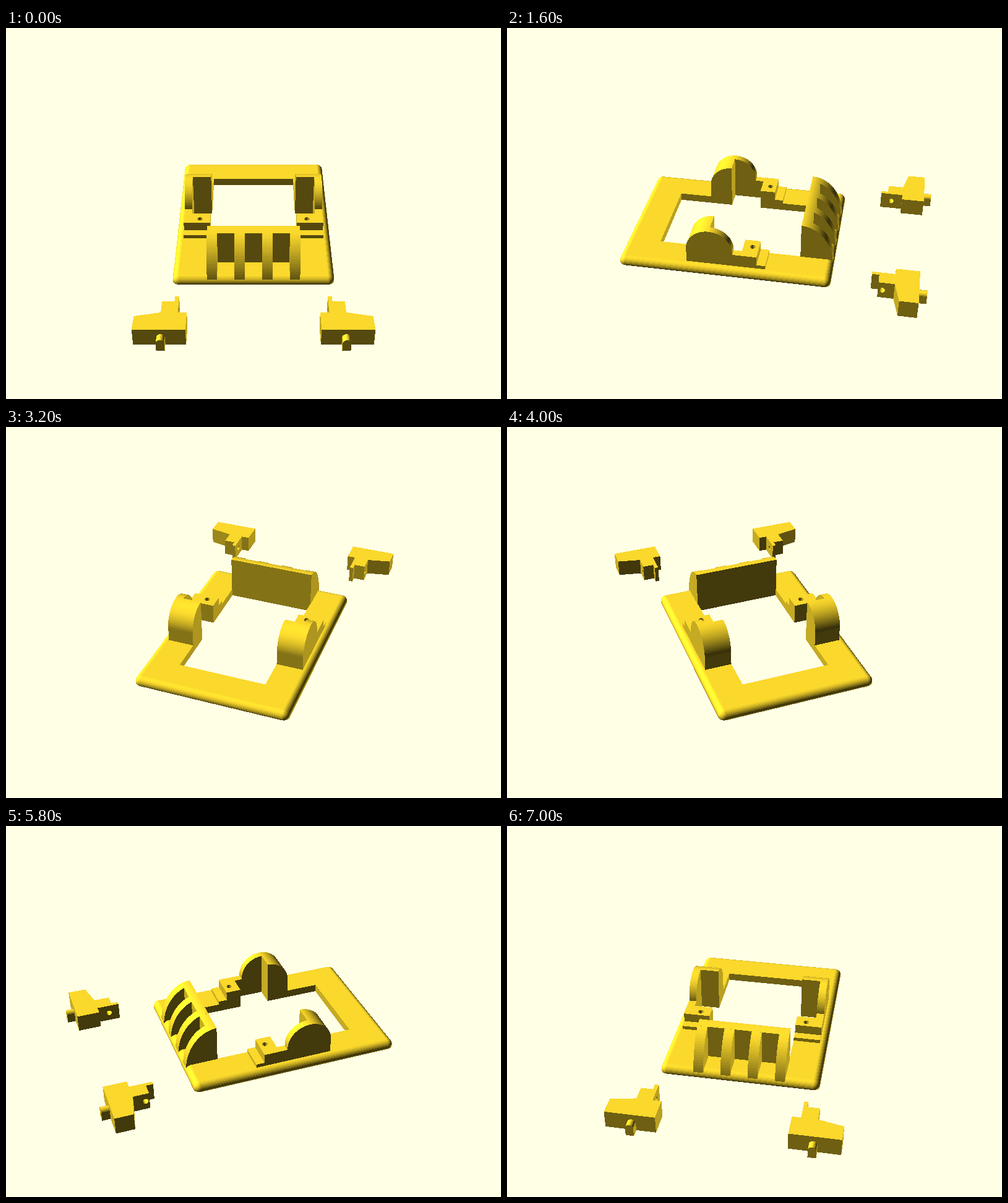
An HTML page with a canvas that plays this animation: 800x600 px, repeating every 7.2 s.

```html
<!DOCTYPE html>
<html lang="en">
<head>
<meta charset="utf-8">
<title>Rotating printed parts</title>
<style>
html, body { margin: 0; width: 100%; height: 100%; overflow: hidden; background: #ffffe5; }
canvas { display: block; }
</style>
</head>
<body>
<canvas id="stage" width="800" height="600"></canvas>
<script>
const W = 800, H = 600, STEP = 200, STEPS = 36;
const DIST = 300 / Math.tan(Math.PI / 16); // 22.5 degree field of view
const TILT = 55 * Math.PI / 180, ct = Math.cos(TILT), st = Math.sin(TILT);
const BASE = [249, 215, 44];

// ---- model: every face is a list of loops, filled even-odd ----
const faces = [];
const alongX = (u, v, t) => [t, u, v];
const alongY = (u, v, t) => [u, t, v];
const alongZ = (u, v, t) => [u, v, t];

const rect = (u0, v0, u1, v1) => [[u0, v0], [u1, v0], [u1, v1], [u0, v1]];

function arc(cu, cv, ru, rv, from, to, n) {
  return Array.from({ length: n + 1 }, (_, i) => {
    const a = (from + (to - from) * i / n) * Math.PI / 180;
    return [cu + ru * Math.cos(a), cv + rv * Math.sin(a)];
  });
}

const circle = (u, v, r) => arc(u, v, r, r, 0, 345, 23);

function join(a, b) {
  a.forEach((p, i) => {
    const j = (i + 1) % a.length;
    faces.push([[p, a[j], b[j], b[i]]]);
  });
}

function extrude(loops, from, to, axis) {
  const at = t => loops.map(loop => loop.map(([u, v]) => axis(u, v, t)));
  const a = at(from), b = at(to);
  faces.push(a, b);
  a.forEach((loop, i) => join(loop, b[i]));
}

const box = (x0, y0, z0, x1, y1, z1) => extrude([rect(x0, y0, x1, y1)], z0, z1, alongZ);

const TOP = -23, BOTTOM = -36;
const HOLE = 69.6, SLOT = 99.5, SIDE = 111.5; // distances from the middle plane
const HOOD = -85, PAD = 2;                    // front end of the hole, rear end of the pads

function buildPlate() {
  const x = 113, front = -127.5, back = 183.5, r = 10, bands = 18;
  const lowest = Math.asin((BOTTOM - TOP + r) / r) * 180 / Math.PI;
  const ring = deg => {
    const a = deg * Math.PI / 180, c = r * Math.cos(a), z = TOP - r + r * Math.sin(a);
    return [[x, back, 0], [-x, back, 90], [-x, front, 180], [x, front, 270]]
      .flatMap(([cx, cy, d]) => arc(cx, cy, c, c, d, d + 90, 8))
      .map(([u, v]) => [u, v, z]);
  };
  const opening = [
    [-HOLE, HOOD], [HOLE, HOOD], [HOLE, PAD], [SLOT, PAD], [SLOT, 51], [HOLE, 51],
    [HOLE, 139.5], [-HOLE, 139.5], [-HOLE, 51], [-SLOT, 51], [-SLOT, PAD], [-HOLE, PAD]
  ];
  const level = z => opening.map(([u, v]) => [u, v, z]);
  const rings = Array.from({ length: bands + 1 }, (_, i) => ring(90 + (lowest - 90) * i / bands));
  for (let i = 0; i < bands; i++) join(rings[i], rings[i + 1]);
  faces.push([rings[0], level(TOP)], [rings[bands], level(BOTTOM)]);
  join(level(TOP), level(BOTTOM));
}

function buildHood() {
  const depth = 51, half = 70.5, ribWidth = 15.3, ribStep = 41.9, base = -32;
  const profile = reach => {
    const end = 180 - Math.acos(reach / depth) * 180 / Math.PI;
    return [[HOOD, base], ...arc(HOOD, base, depth, 68, 90, end, reach < depth ? 6 : 24), [HOOD - reach, base]];
  };
  extrude([profile(14)], -half, half, alongX);
  for (let i = 0; i < 4; i++) {
    const x = -half + i * ribStep;
    extrude([profile(depth)], x, x + ribWidth, alongX);
  }
}

function buildSide(s) {
  // wheel arch: thin outer disc, thick rear half
  const arch = (to, n) => [[87, TOP], ...arc(51, 1, 36, 36, 0, to, n), [to > 90 ? 15 : 51, TOP]];
  extrude([arch(180, 40)], s * SLOT, s * SIDE, alongX);
  extrude([arch(90, 20)], s * HOLE, s * SIDE, alongX);
  // screw pad, its link to the disc and a low step in front
  extrude([rect(s * HOLE, -22.5, s * SIDE, PAD), circle(s * 86, -12.5, 4.5)], TOP, -2, alongZ);
  box(s * SLOT, PAD, TOP, s * SIDE, 16, -2);
  box(s * HOLE, -36, TOP, s * SIDE, -22.5, -17);
}

function buildClip(s) {
  const body = [[169, -269], [94.5, -269], [94.5, -233], [131.5, -233], [169, -241]];
  extrude([body.map(([x, y]) => [s * x, y])], BOTTOM, -8, alongZ);
  extrude([rect(-233, BOTTOM, -209, -8), circle(-215, -22, 4.5)], s * 107.5, s * 131.5, alongX);
  box(s * 107.5, -209, BOTTOM, s * 113.5, -198, -8);
  const cx = s * 129.5;
  extrude([[[cx + 6, BOTTOM], ...arc(cx, -22.5, 6, 6, 0, 180, 16), [cx - 6, BOTTOM]]], -281.5, -269, alongY);
}

buildPlate();
buildHood();
for (const s of [-1, 1]) {
  buildSide(s);
  buildClip(s);
}

// ---- depth-buffered polygon renderer ----
const ctx = document.getElementById("stage").getContext("2d");
const image = ctx.createImageData(W, H);
const pixels = new Uint32Array(image.data.buffer);
const depth = new Float32Array(W * H);
const pack = (r, g, b) => (255 << 24 | b << 16 | g << 8 | r) >>> 0;
const BACKGROUND = pack(255, 255, 229);

function planeNormal(loop) {
  const n = [0, 0, 0];
  loop.forEach((p, i) => {
    const q = loop[(i + 1) % loop.length];
    for (let k = 0; k < 3; k++) {
      const a = (k + 1) % 3, b = (k + 2) % 3;
      n[k] += (p[a] - q[a]) * (p[b] + q[b]);
    }
  });
  const len = Math.hypot(...n);
  return len > 1e-6 ? n.map(v => v / len) : null;
}

function drawFace(loops) {
  const n = planeNormal(loops[0]);
  if (!n) return;
  const p = loops[0][0], d = n[0] * p[0] + n[1] * p[1] + n[2] * p[2];
  if (Math.abs(d) < 1e-4) return;

  const light = 0.2 + Math.abs(n[1] - n[0] - n[2]) / Math.sqrt(3);
  const color = pack(...BASE.map(c => Math.min(255, Math.round(c * light))));

  const edges = [];
  let top = H, bottom = 0;
  for (const loop of loops) {
    const pts = loop.map(([x, y, w]) => [W / 2 + DIST * x / w, H / 2 - DIST * y / w]);
    pts.forEach((a, i) => {
      edges.push([a, pts[(i + 1) % pts.length]]);
      top = Math.min(top, a[1]);
      bottom = Math.max(bottom, a[1]);
    });
  }

  const lastRow = Math.min(H, Math.ceil(bottom - 0.5));
  for (let row = Math.max(0, Math.ceil(top - 0.5)); row < lastRow; row++) {
    const y = row + 0.5, cuts = [];
    for (const [a, b] of edges) {
      if ((a[1] <= y) !== (b[1] <= y)) cuts.push(a[0] + (b[0] - a[0]) * (y - a[1]) / (b[1] - a[1]));
    }
    cuts.sort((a, b) => a - b);
    const rowPart = n[1] * (H / 2 - y) + n[2] * DIST;
    for (let i = 0; i + 1 < cuts.length; i += 2) {
      const end = Math.min(W, Math.ceil(cuts[i + 1] - 0.5));
      for (let x = Math.max(0, Math.ceil(cuts[i] - 0.5)); x < end; x++) {
        const near = (n[0] * (x + 0.5 - W / 2) + rowPart) / d, at = row * W + x;
        if (near > depth[at]) {
          depth[at] = near;
          pixels[at] = color;
        }
      }
    }
  }
}

function render(step) {
  const angle = step * 2 * Math.PI / STEPS, c = Math.cos(angle), s = Math.sin(angle);
  const toEye = ([x, y, z]) => {
    const v = s * x + c * y;
    return [c * x - s * y, ct * v + st * z, DIST + st * v - ct * z];
  };
  pixels.fill(BACKGROUND);
  depth.fill(0);
  for (const face of faces) drawFace(face.map(loop => loop.map(toEye)));
  ctx.putImageData(image, 0, 0);
}

const start = performance.now();
let shown = -1;
function tick() {
  const step = Math.floor(Math.max(0, performance.now() - start) / STEP) % STEPS;
  if (step !== shown) render(shown = step);
  requestAnimationFrame(tick);
}
tick();
</script>
</body>
</html>
```
